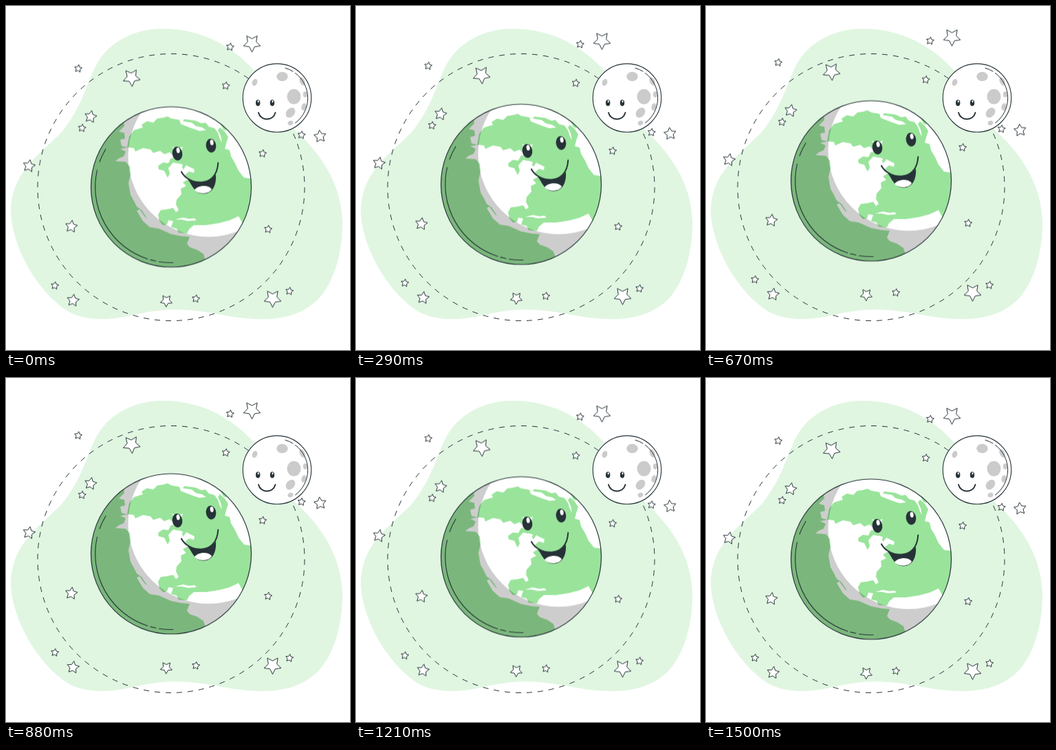
Recreate the animation shown at these times as an HTML page. Size 500 px wide and 500 px high, loop 1540 ms.

```html
<!DOCTYPE html>
<html lang="en">
<head>
<meta charset="utf-8">
<title>Happy planet and moon</title>
<style>
  html, body { margin: 0; width: 100%; height: 100%; overflow: hidden; background: #fff; }
  svg { display: block; width: 100vw; height: 100vh; }
  .line { fill: none; stroke: #263238; stroke-linecap: round; stroke-linejoin: round; }
  .edge { stroke: #263238; stroke-linejoin: round; }
  .ink { fill: #263238; }
  .float { animation: float 1540ms linear infinite; }
  @keyframes float {
    0%, 100% { transform: translateY(-.5px); }
    46.75% { transform: translateY(-10px); }
    96.1% { transform: translateY(0); }
  }
</style>
</head>
<body>
<svg viewBox="0 0 500 500">
  <defs>
    <clipPath id="globe"><circle cx="240" cy="263.5" r="116.5"/></clipPath>
    <clipPath id="disc"><circle cx="394" cy="133.6" r="49.7"/></clipPath>
  </defs>

  <path fill="#e0f6e1" d="M230 33C185 32 148 54 131 86C116 116 111 145 82 182C52 214 7 240 7 300C9 350 45 416 92 445C125 461 160 455 195 447C240 437 275 441 320 450C380 461 430 456 459 420C481 392 489 350 489 315C488 265 465 225 430 190C400 165 392 125 362 95C332 62 290 34 230 33Z"/>
  <circle class="line" cx="240" cy="263.5" r="194" pathLength="1216" stroke-dasharray="8 8" style="stroke-linecap:butt"/>

  <g id="moon">
    <circle cx="394" cy="133.6" r="49.7" fill="#fff"/>
    <g fill="#cbcbcb" clip-path="url(#disc)">
      <ellipse cx="401.5" cy="102.5" rx="8.2" ry="6.8"/>
      <ellipse cx="361.5" cy="111" rx="3.7" ry="5.2" transform="rotate(20 361.5 111)"/>
      <ellipse cx="418.5" cy="131.7" rx="10" ry="11"/>
      <ellipse cx="413.5" cy="155" rx="6" ry="8" transform="rotate(40 413.5 155)"/>
      <ellipse cx="430.5" cy="109.5" rx="3.5" ry="6.5" transform="rotate(-25 430.5 109.5)"/>
      <ellipse cx="435" cy="128.5" rx="3.2" ry="4.2"/>
      <ellipse cx="433" cy="146.5" rx="3.5" ry="5.3" transform="rotate(15 433 146.5)"/>
      <ellipse cx="413.5" cy="170" rx="4" ry="3.3" transform="rotate(-25 413.5 170)"/>
    </g>
    <circle class="line" cx="394" cy="133.6" r="49.7" stroke-width="1.1"/>
    <path class="line" d="M406 90.2A45 45 0 0 1 417 95M420.5 97.5A45 45 0 0 1 420.5 170"/>
    <ellipse class="ink" cx="366.2" cy="140.8" rx="3.2" ry="4.6"/>
    <ellipse class="ink" cx="387" cy="140.8" rx="3.2" ry="4.6"/>
    <ellipse fill="#fff" cx="366.7" cy="138.8" rx="1" ry="1.7"/>
    <ellipse fill="#fff" cx="387.5" cy="138.8" rx="1" ry="1.7"/>
    <path class="line" stroke-width="1.9" d="M367 155C370 167.500 388 168 391.500 155"/>
  </g>

  <g class="float">
    <g id="stars" class="edge" fill="#fff"></g>

    <g clip-path="url(#globe)">
      <circle cx="240" cy="263.5" r="117" fill="#99e49a"/>
      <g fill="#fff">
        <!-- polar cap and eastern land -->
        <path d="M171 168L172 175L164 183L172 185L173 193L166 195L168 204L176 206L179 190L186 181L199 177L197 173L205 168L214 170L220 164L228 163L235 161L240 164L252 166L254 172L264 176L272 179L281 182L291 181L285 177L276 175L270 170L257 168L259 165L275 167L284 171L290 170L295 176L303 178L308 185L311 194L314 199L312 189L308 181L311 177L318 183L323 191L320 200L318 208L325 210L327 219L333 229L338 240L346 250L360 252L360 140L171 140Z"/>
        <!-- northern continent -->
        <path d="M178 206L186 207L188 212L199 207L210 209L214 214L224 211L230 216L238 213L243 219L239 223L236 229L228 228L221 233L222 238L230 240L235 250L238 244L236 236L243 228L252 230L258 238L262 232L274 238L273 243L266 241L260 246L265 252L257 257L262 262L254 266L255 274L248 282L247 289L251 297L247 300L243 294L234 296L225 297L221 304L223 313L228 319L234 318L236 312L243 313L240 322L248 324L251 330L263 331L266 325L273 319L291 319L310 316L325 312L338 306L342 313L350 330L320 380L290 371L287 361L278 355L267 351L263 346L267 336L255 335L240 332L222 324L209 322L199 313L190 298L194 296L202 307L205 309L197 297L190 292L186 284L181 275L178 258L181 245L180 234L174 227L159 226L164 222L171 219L174 212L166 208Z"/>
        <path d="M246 311L257 308L267 310L274 309L277 312L264 313L256 311Z"/>
        <path d="M250 229L257 231L256 235ZM241 205L249 208L257 205L255 211L246 212ZM231 216L246 216L250 224L241 221Z"/>
      </g>
      <path fill="#99e49a" d="M311 171L317 174L321 182L316 180ZM307 166L312 168L308 170Z"/>
      <path fill="#000" fill-opacity=".195" fill-rule="evenodd" d="M120 140H360V385H120ZM177.500 219a117 117 0 1 0 234 0a117 117 0 1 0 -234 0Z" clip-path="url(#night)"/>
    </g>
    <clipPath id="night"><path d="M120 140H197L300 250L341 325V385H120Z"/></clipPath>

    <circle class="line" cx="240" cy="263.5" r="116.5" stroke-width="1.2"/>
    <path class="line" stroke-width="1.1" d="M145 208.500A110 110 0 0 0 136 227M132.500 239A110 110 0 0 0 206 368.200M210 369.400L218 371.300M222.500 372.200A110 110 0 0 0 243 373.500"/>

    <g transform="rotate(-8 249 215)">
      <ellipse class="ink" cx="249" cy="215" rx="7.300" ry="10"/>
      <ellipse fill="#fff" cx="250.800" cy="210.500" rx="2.500" ry="4"/>
    </g>
    <g transform="rotate(-8 298 203.500)">
      <ellipse class="ink" cx="298" cy="203.500" rx="7.300" ry="10"/>
      <ellipse fill="#fff" cx="299.800" cy="199" rx="2.500" ry="4"/>
    </g>
    <path class="ink" d="M264 252.500C276 259 295 258.500 305 245.500C306 258 302 273 287 273.500C274 273.500 271 261 264 252.500Z"/>
    <path fill="#fff" d="M274 268C278 261.500 293 259.500 299 266.500C296 274 280 275 274 268Z"/>
    <path class="line" stroke-width="2" d="M255 241.500C264 260 306 268 308.300 228.500"/>
  </g>
</svg>
<script>
  // x, y, radius, tilt in degrees
  const stars = [
    [105, 91.5, 5.8, 8], [182.5, 104.5, 13, 176], [123, 161.5, 9.2, 10], [110.5, 178, 5.8, 8],
    [33.5, 233, 9.2, 10], [95, 321, 9.2, 8], [71, 407, 5.8, 8], [97.5, 428.5, 9.2, 8],
    [233, 429, 9, 182], [276, 426, 5.8, 8], [387.500, 425.5, 13, 180], [412, 415, 5.8, 8],
    [381, 325, 5.8, 8], [373, 215, 5.8, 8], [429.5, 188, 5.8, 8], [456.5, 190, 9.2, -6],
    [319.5, 116.5, 5.8, 8], [325.700, 60, 5.8, 8], [357.5, 54.500, 13, 180]
  ];
  const starPath = ([x, y, r, tilt]) => 'M' + Array.from({ length: 10 }, (_, i) => {
    const a = (tilt + i * 36 - 90) * Math.PI / 180;
    const d = i % 2 ? r * 0.5 : r;
    return (x + d * Math.cos(a)).toFixed(2) + ' ' + (y + d * Math.sin(a)).toFixed(2);
  }).join('L') + 'Z';
  const group = document.getElementById('stars');
  for (const star of stars) {
    const path = document.createElementNS(group.namespaceURI, 'path');
    path.setAttribute('d', starPath(star));
    group.append(path);
  }
</script>
</body>
</html>
```
